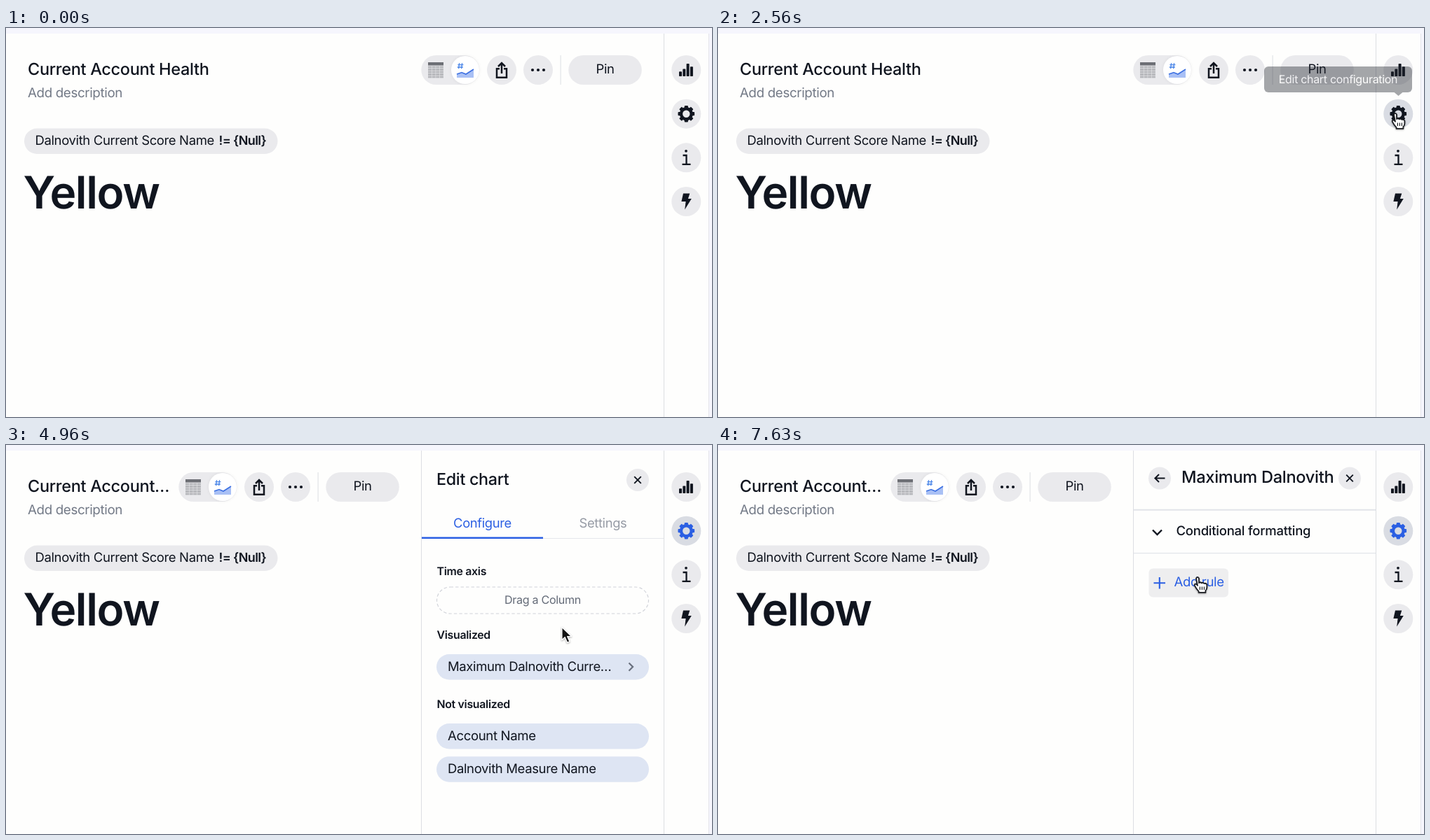
These frames come from a looping animation (1007 by 556 pixels, 8000 ms). An HTML page:

```html
<!DOCTYPE html>
<html lang="en">
<head>
<meta charset="utf-8">
<title>Edit chart</title>
<style>
  html, body { margin: 0; width: 100%; height: 100%; overflow: hidden; background: #fefefd; }
  svg { display: block; width: 1007px; height: 556px; }
  text {
    font-family: Inter, "Liberation Sans", sans-serif;
    letter-spacing: -.02em;
    text-rendering: geometricPrecision;
    white-space: pre;
  }
  text[font-weight="500"] { letter-spacing: -.013em; }
</style>
</head>
<body>
<svg id="stage" viewBox="0 0 1007 556"></svg>
<script>
const LOOP = 8000;
const INK = '#10151f', BLUE = '#2b5fe3', GREY = '#eaeaed', MUTED = '#727986', PAGE = '#fefefd';
const PILL = [222, 229, 243], PILL_HOVER = [199, 214, 246], PILL_DOWN = [166, 189, 245];
const BTN = [234, 234, 237], BTN_HOVER = [217, 220, 227], BTN_DOWN = [185, 191, 203];
const CHEVRON = [107, 114, 128], CHEVRON_HOVER = [16, 21, 31];
const PANEL_W = 346;

// Markup helpers
const text = (x, y, size, str, o = {}) =>
  `<text x="${x}" y="${y}" font-size="${size}" font-weight="${o.weight || 400}" fill="${o.fill || INK}"` +
  ` text-anchor="${o.anchor || 'start'}"${o.gap ? ` style="letter-spacing:${o.gap}em"` : ''}` +
  `${o.id ? ` id="${o.id}"` : ''}>${str}</text>`;
const rect = (x, y, w, h, fill, r = 0, more = '') =>
  `<rect x="${x}" y="${y}" width="${w}" height="${h}" rx="${r}" fill="${fill}" ${more}/>`;
const disc = (x, y, r, fill, more = '') =>
  `<circle cx="${x}" cy="${y}" r="${r}" fill="${fill}" ${more}/>`;
const line = (d, stroke, width, more = '') =>
  `<path d="${d}" fill="none" stroke="${stroke}" stroke-width="${width}" ${more}/>`;
const cross = (x, y, s, color, width) =>
  line(`M${x - s} ${y - s}l${2 * s} ${2 * s}M${x + s} ${y - s}l${-2 * s} ${2 * s}`, color, width);
const group = (id, body, more = '') => `<g id="${id}" ${more}>${body}</g>`;

function tableIcon(x, y) {
  let out = rect(x, y, 22, 4.5, '#6d6f75');
  for (let row = 0; row < 5; row++)
    for (let col = 0; col < 4; col++)
      out += rect(x + col * 5.6, y + 5.5 + row * 3.5, 5.1, 2.9, '#b7b8bc');
  return out;
}

function gear(x, y) {
  let out = '<circle r="7.4" fill="none" stroke="currentColor" stroke-width="4.4"/>';
  for (let i = 0; i < 8; i++)
    out += `<rect x="-2.6" y="-11.8" width="5.2" height="5" rx="1" fill="currentColor" transform="rotate(${i * 45})"/>`;
  return group('gear', out, `transform="translate(${x} ${y})"`);
}

const toolbar = [
  rect(592.3, 39, 83, 42, GREY, 21),
  tableIcon(602, 49),
  disc(655, 60, 20, '#fff', 'style="filter:drop-shadow(0 0 2px #0001)"'),
  line('M646.6 50.2l-1 8M650.6 50.2l-1 8M644.4 52.6h8M643.8 56h8', '#4b86e8', 1.3),
  '<path d="M643 66l7-2.5 6 2.5 11-7v12h-24z" fill="#a9c0f5"/>',
  line('M643 66l7-2.5 6 2.5 11-7', '#3c70e2', 1.6),
  disc(707, 60, 21, GREY),
  line('M704 58.2h-4v12.6h14v-12.6h-4M707 65v-14M702 55l5-5 5 5', INK, 2.5),
  disc(759, 60, 21, GREY),
  ...[751, 759, 767].map(x => disc(x, 60, 2.1, INK)),
  rect(790.6, 39, 1, 42, '#dcdee3'),
  rect(802.3, 39, 104.5, 42, GREY, 21),
  text(854.5, 65, 18.5, 'Pin', { anchor: 'middle' })
].join('');

const page = [
  text(31, 67, 23.5, '', { weight: 500, id: 'title' }),
  text(31, 99, 18.8, 'Add description', { fill: MUTED }),
  rect(26, 143.5, 361.5, 36.5, GREY, 18.2),
  text(41.5, 167, 18.5, 'Dalnovith Current Score Name'),
  text(303.5, 167, 18, '!= {Null}', { weight: 600, gap: -.035 }),
  text(24.5, 258, 64, 'Yellow', { weight: 600, gap: -.022 })
].join('');

const label = (y, str) => text(614.5, y, 15.9, str, { weight: 600 });
const config = [
  text(614, 57, 23.3, 'Edit chart', { weight: 500 }),
  disc(901, 50, 16, GREY), cross(901, 50, 4.8, INK, 1.9),
  text(679.5, 118, 18.4, 'Configure', { fill: BLUE, anchor: 'middle' }),
  text(851.5, 118, 18.4, 'Settings', { fill: '#969ba5', anchor: 'middle' }),
  rect(593, 133, 345, 1, '#e6e7eb'), rect(593, 131.5, 173, 2.5, BLUE),
  label(185.5, 'Time axis'),
  rect(614.5, 203, 302, 38, 'none', 19, 'stroke="#d2d4da" stroke-width="1.2" stroke-dasharray="4.5 3"'),
  text(765.5, 226.5, 16.1, 'Drag a Column', { fill: '#636a77', anchor: 'middle' }),
  label(276.5, 'Visualized'),
  rect(614, 299, 303, 36.5, '', 18.2, 'id="pill"'),
  text(630, 322.5, 18.5, 'Maximum Dalnovith Curre…'),
  line('M888.5 311.5l5.6 5.6-5.6 5.6', '', 2.2, 'id="chevron"'),
  group('badge', disc(917, 299, 10.4, '#676c78') + cross(917, 299, 3.8, '#fff', 2)),
  label(375.8, 'Not visualized'),
  rect(614, 398, 303, 36.5, '#dee5f3', 18.2), text(630, 421.5, 18.6, 'Account Name'),
  rect(614, 445.2, 303, 36.5, '#dee5f3', 18.2), text(630, 468.5, 18.5, 'Dalnovith Measure Name')
].join('');

const detail = [
  rect(592, 8, PANEL_W, 548, PAGE),
  disc(630, 47.5, 16, GREY),
  line('M637.5 47.5h-14M629 42l-5.6 5.5 5.6 5.5', INK, 2),
  text(661, 54, 23.6, 'Maximum Dalnovith', { weight: 500 }),
  disc(901, 47.5, 16, GREY), cross(901, 47.5, 4.8, INK, 1.9),
  rect(593, 91.7, 345, 2, '#e2e4e9'),
  line('M620 121.5l6.5 6.5 6.5-6.5', INK, 2.4),
  text(653.5, 129, 18.5, 'Conditional formatting', { weight: 500 }),
  rect(593, 154, 345, 1.2, '#e2e4e9'),
  rect(614.5, 176.5, 113.5, 41, '#eeeeef', 6),
  line('M621.5 197.2h16.5M629.8 189v16.5', BLUE, 2.1),
  text(650.5, 202, 18.6, 'Add rule', { fill: BLUE })
].join('');

const sidebar = [
  rect(938, 8, 69, 548, PAGE),
  rect(938, 8, 1, 548, '#dcdee3'),
  rect(1002, 8, 5, 548, '#f6f6fd'), rect(1002, 8, 1, 548, '#e2e3ea'),
  disc(970.3, 60, 21, GREY),
  rect(960, 62.3, 4, 6.7, INK, .7), rect(965.3, 58.4, 4, 10.6, INK, .7),
  rect(970.6, 51, 4, 18, INK, .7), rect(975.9, 55.2, 4, 13.8, INK, .7),
  disc(970.3, 122.7, 21, '', 'id="gearBack"'), gear(970.3, 122.7),
  disc(970.3, 185.3, 21, GREY),
  disc(970, 175.8, 1.9, INK), line('M965.5 182h5v12.5M964.5 194.8h12', INK, 2.3),
  disc(970.3, 248, 21, GREY),
  `<path d="M966 236.500h9.300l-2.400 7.500h4.900l-9.600 15.500 1.400-11.500h-6.200z" fill="${INK}"/>`
].join('');

const tooltip =
  rect(779, 55, 211, 37, '#22262f', 6) +
  '<path d="M964 91.5h13l-6.5 5.5z" fill="#22262f"/>' +
  text(884.5, 79, 16, 'Edit chart configuration', { fill: '#fff', anchor: 'middle' });

const arrow =
  '<path d="M0 0v18.5l4.3-3.9 3.4 7.6 3.5-1.5-3.3-7.3h5.8z" fill="#111" stroke="#fff" stroke-width="1.4" stroke-linejoin="round"/>';
const hand =
  '<path d="M-2 1.7q2-3.6 4 0v6.4q1.8-1.7 3.7.3 1.9-1.5 3.7.6 2.6-1 4 1.6v3.8q0 2.8-2 4.8v2.7h-9.8v-1.8q-3.2-3.1-5.2-7.2-1.6-2.700.3-3.300 1.700-.4 3.300 2.200z" fill="#fff" stroke="#1b1d22" stroke-width="1.8" stroke-linejoin="round"/>' +
  line('M3.4 13.5v4.5M6.4 13.5v4.5M9.4 13.5v4.5', '#1b1d22', 1.2);

document.getElementById('stage').innerHTML = [
  rect(0, 0, 1007, 556, PAGE),
  page,
  group('toolbar', toolbar),
  group('panel', rect(592, 8, PANEL_W, 548, PAGE) + config + group('detail', detail) +
    rect(592, 8, 1, 548, '#dcdee3')),
  sidebar,
  rect(0, 0, 1007, 8, '#f6f6fd'),
  group('tooltip', tooltip),
  group('cursor', group('arrow', arrow) + group('hand', hand),
    'style="filter:drop-shadow(0 1px 1px #0005)"')
].join('');

const el = {};
for (const node of document.querySelectorAll('[id]')) el[node.id] = node;

// Timing helpers
const ramp = (t, a, b) => Math.min(1, Math.max(0, (t - a) / (b - a)));
const easeOut = p => 1 - (1 - p) ** 3;
const rgb = c => `rgb(${c.map(Math.round)})`;
const mix = (a, b, p) => rgb(a.map((v, i) => v + (b[i] - v) * p));
const show = (node, on) => node.setAttribute('visibility', on ? 'inherit' : 'hidden');
const shift = (node, x, y) => node.setAttribute('transform', `translate(${x.toFixed(2)} ${y.toFixed(2)})`);

// Pointer hotspot: time, x, y
const PATH = [
  [1220, 1006, 171], [1450, 991, 150], [1660, 975, 128], [1900, 966, 122],
  [3500, 966, 122], [3700, 962, 121], [4330, 962, 121], [4560, 920, 148],
  [4760, 845, 212], [4960, 793, 260], [5160, 772, 299], [5330, 766, 312],
  [7100, 766, 312], [7300, 735, 270], [7450, 702, 222], [7630, 684, 189]
];
const slope = (i, k) => (PATH[i + 1][k] - PATH[i][k]) / (PATH[i + 1][0] - PATH[i][0]);
function tangent(i, k) {
  if (i === 0 || i === PATH.length - 1) return 0;
  const a = slope(i - 1, k), b = slope(i, k);
  return a * b > 0 ? 2 * a * b / (a + b) : 0;
}
// Monotone cubic, so the pointer never overshoots
function pointer(t, k) {
  const last = PATH.length - 1;
  if (t <= PATH[0][0]) return PATH[0][k];
  if (t >= PATH[last][0]) return PATH[last][k];
  const i = PATH.findIndex(p => p[0] > t) - 1;
  const span = PATH[i + 1][0] - PATH[i][0], u = (t - PATH[i][0]) / span, v = 1 - u;
  return PATH[i][k] * (1 + 2 * u) * v * v + tangent(i, k) * span * u * v * v +
    PATH[i + 1][k] * u * u * (3 - 2 * u) - tangent(i + 1, k) * span * u * u * v;
}

function draw(t) {
  const open = t >= 3500;
  const slide = easeOut(ramp(t, 3470, 3690));
  el.title.textContent = open ? 'Current Account…' : 'Current Account Health';
  shift(el.toolbar, open ? -PANEL_W * slide : 0, 0);
  shift(el.panel, PANEL_W * (1 - slide), 0);
  show(el.panel, open);

  const gearDown = t >= 3100 && !open;
  el.gearBack.setAttribute('fill', gearDown ? rgb(BTN_DOWN) : mix(BTN, BTN_HOVER, ramp(t, 1540, 1650)));
  el.gear.setAttribute('color', open ? BLUE : INK);
  el.tooltip.setAttribute('opacity', t < 3100 ? ramp(t, 2400, 2800) : 0);

  const over = ramp(t, 5060, 5160);
  el.pill.setAttribute('fill', t >= 6130 ? rgb(PILL_DOWN) : mix(PILL, PILL_HOVER, over));
  el.chevron.setAttribute('stroke', mix(CHEVRON, CHEVRON_HOVER, over));
  show(el.badge, t >= 5080);
  el.detail.setAttribute('opacity', easeOut(ramp(t, 6300, 6630)));

  const pointing = (t >= 1550 && t < 3560) || (t >= 5080 && t < 6430) || t >= 7480;
  show(el.cursor, t >= 1230);
  show(el.hand, pointing);
  show(el.arrow, !pointing);
  shift(el.cursor, pointer(t, 1), pointer(t, 2));
}

const start = performance.now();
function tick() {
  draw((performance.now() - start) % LOOP);
  requestAnimationFrame(tick);
}
tick();
</script>
</body>
</html>
```
